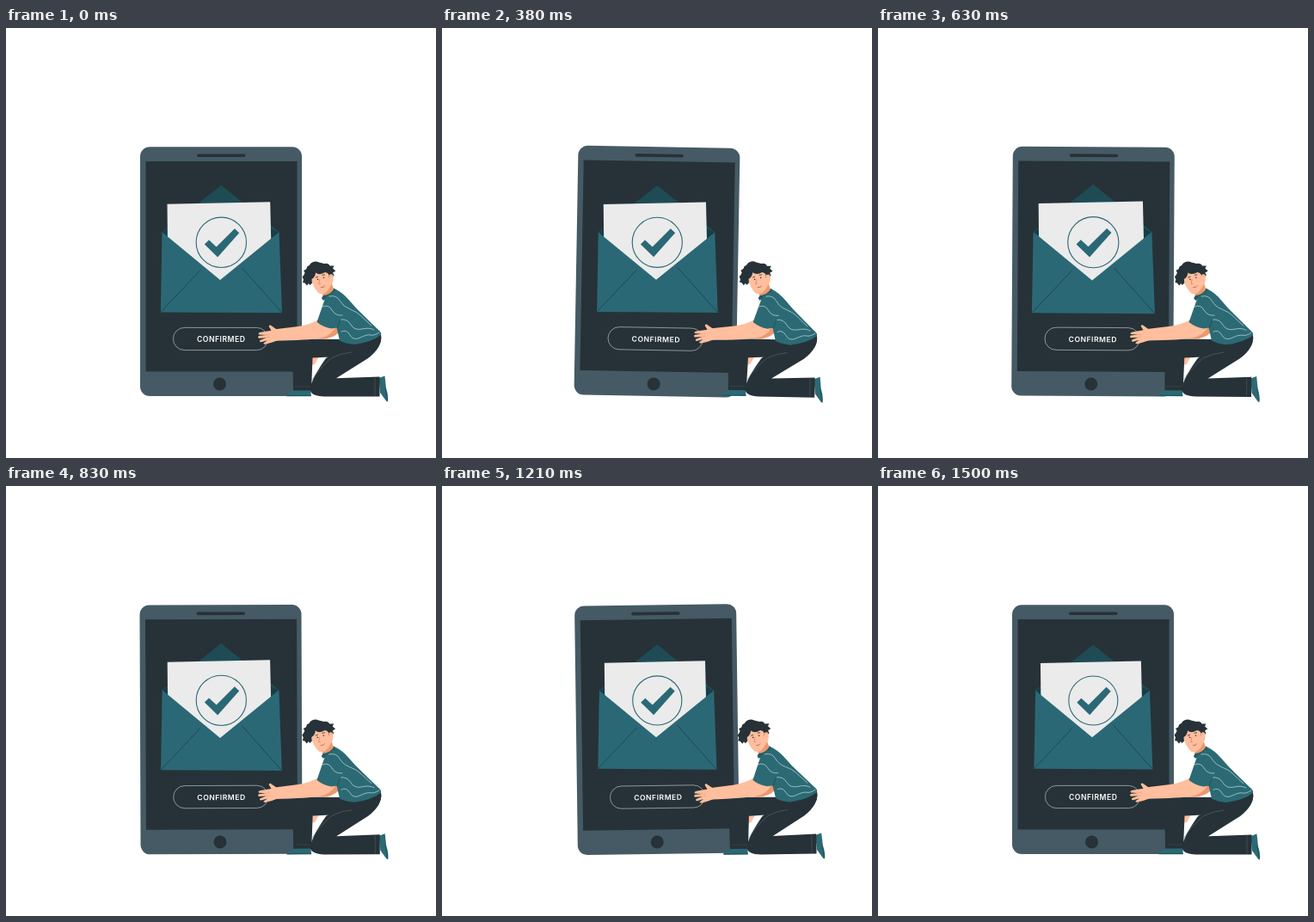
An HTML page with a canvas for the animation above (1.54 s loop, 500x500 px).

```html
<!DOCTYPE html>
<html lang="en">
<head>
<meta charset="utf-8">
<title>Confirmed</title>
<style>
html, body { margin: 0; width: 100%; height: 100%; overflow: hidden; background: #fff; }
canvas { display: block; width: 500px; height: 500px; }
</style>
</head>
<body>
<canvas id="stage"></canvas>
<script>
const canvas = document.getElementById('stage');
const ctx = canvas.getContext('2d');
const dpr = window.devicePixelRatio || 1;
canvas.width = canvas.height = 500 * dpr;

const LOOP = 1540, STEPS = 37;
const BODY = '#455a64', DARK = '#263238', TEAL = '#2b6875', DEEP = '#1f4b55';
const PAPER = '#ebebeb', SKIN = '#ffbe9d', SHADE = '#eb996e';
const SHIRT = '#2b6a74', WAVE = '#c9dadd';

// Envelope beat: [part of the cycle, scale]
const BEAT = [[0, 1], [.14, 1.043], [.28, .983], [.42, 1.014], [.7, .98], [1, .977]];

function fill(d, color) {
  ctx.fillStyle = color;
  ctx.fill(new Path2D(d));
}

function line(d, color, width) {
  ctx.strokeStyle = color;
  ctx.lineWidth = width;
  ctx.stroke(new Path2D(d));
}

function box(x, y, w, h, r, color) {
  ctx.beginPath();
  ctx.roundRect(x, y, w, h, r);
  ctx.fillStyle = color;
  ctx.fill();
}

function disc(x, y, r, color) {
  ctx.beginPath();
  ctx.arc(x, y, r, 0, 2 * Math.PI);
  ctx.fillStyle = color;
  ctx.fill();
}

function around(x, y, angle, scale, draw) {
  ctx.save();
  ctx.translate(x, y);
  ctx.rotate(angle);
  ctx.scale(scale, scale);
  ctx.translate(-x, -y);
  draw();
  ctx.restore();
}

function swing(p) {
  const turn = p < .25 ? 4 * p : p < .75 ? 2 - 4 * p : 4 * p - 4;
  return turn * Math.PI / 180;
}

function beat(p) {
  const i = Math.max(1, BEAT.findIndex(k => k[0] >= p));
  const [p0, s0] = BEAT[i - 1], [p1, s1] = BEAT[i];
  return s0 + (s1 - s0) * (p - p0) / (p1 - p0);
}

function phone() {
  box(156, 138.3, 188, 289.7, 11, BODY);
  box(162.5, 155, 176, 244.5, 0, DARK);
  box(222, 146.5, 56.5, 3.6, 1.8, DARK);
  disc(248.5, 414, 7.5, DARK);

  ctx.beginPath();
  ctx.roundRect(194.4, 348.4, 110.2, 26.2, 13.1);
  ctx.strokeStyle = '#d4d8da';
  ctx.lineWidth = .6;
  ctx.stroke();

  ctx.fillStyle = '#fff';
  ctx.font = '600 8.6px Inter, sans-serif';
  ctx.letterSpacing = '.5px';
  ctx.textAlign = 'center';
  ctx.textBaseline = 'alphabetic';
  ctx.fillText('CONFIRMED', 250.2, 365.1);
}

function envelope() {
  fill('M181.7 237L250.3 182.8L317.3 237L318 262H181Z', DEEP);
  fill('M181.7 238L190 232V246ZM317.3 238L306 232V248Z', '#173d46');
  fill('M187.5 204.7L307.2 202.2L308.6 262L249 300L188 256Z', PAPER);
  fill('M181.5 237.3L249 293L317.5 237.3L321 331.3L179.8 330.4Z', TEAL);
  line('M180.5 329.7L226 281.5M320.5 330.7L274 278.5', '#1b444f', .9);
  ctx.beginPath();
  ctx.arc(250.3, 249.3, 29.2, 0, 2 * Math.PI);
  ctx.strokeStyle = TEAL;
  ctx.lineWidth = 1.1;
  ctx.stroke();
  fill('M230.8 251.6L236 246.5L244.6 254.4L265.9 233.2L271.2 238.2L246.1 266.4Z', TEAL);
}

function legs() {
  fill('M356 383L364 382L359 391L355 392Z', SKIN);
  fill('M326 428.3Q326 425.5 330 424L339 420H354L355 428.3Z', SHIRT);
  line('M327 427.5H354', '#1d4a53', .8);
  fill('M433.5 407L440.5 404.5L442 419Q444.8 427 444 434.5L442.3 434L435 424Z', SHIRT);
  line('M441 418L443.5 433', '#1d4a53', .7);

  // Kneeling leg, then the raised one
  fill('M436 357Q438 371 421 384L384 407.3L434.5 405.4V428.5H370Q354 428 353.5 420Q355 408 372 384L402 366Z', DARK);
  fill('M334 421.5L333.3 378Q332 362 344 361.5L389 362L409 366L436 356Q438 366 430 374Q412 384 372 382.7L356.5 383.5L355 421.5Z', DARK);
  line('M356 409Q363 397 378 384Q389 378 402 377', '#697078', .5);
  line('M429 406V428', '#59646b', .5);
  line('M336 417H354', '#4a555c', .4);
}

function arms() {
  fill('M384 347L388 353Q378 364 360 361L366 352Z', SHADE);
  fill('M311 350.5L340 347Q354 345 365 338L383 348Q378 358 366 360.5Q352 363 312 363.8Z', SKIN);
  fill('M314 350L307.5 345.5Q304.8 345.5 306.2 348L308.5 351.7L296 353.8Q292.5 354.7 294 356.4'
    + 'L302 357L294 358Q292 359.6 294.3 360.8L302.5 360.2L295.5 363Q294 364.8 296.5 365.2'
    + 'L304 363.2L299.5 366.2Q299 368 302 367.6L309 365.7L317 362.8Z', SKIN);
  line('M301 357L307 356.6M302 360.3L307 359.3', SHADE, .5);
}

function shirt() {
  fill('M370 307Q377 302 382 303Q392 308 399 316.5Q407 326 415 333.5L433 351Q437 354 436 357Q426 365 405 368'
    + 'Q394 367 388 363.5L384.5 348.5L378.5 349.5Q369 348 361.5 342L370.5 316L367.5 315Z', SHIRT);
  ctx.save();
  ctx.lineCap = 'round';
  line('M376 312Q384 310 388 317T400 327T412 334T425 346', WAVE, .7);
  line('M368 324Q375 321 379 328T391 334', WAVE, .7);
  line('M389 339Q397 338 401 345T414 350T428 351', WAVE, .7);
  line('M390 353Q396 350 400 357T412 360T424 357T434 354', WAVE, .7);
  ctx.restore();
  line('M385 349L389 338', DEEP, .8);
  fill('M367 314Q370 308 377 306L381.5 302.5L383 306L374 311L369 317Z', '#235a64');
}

function head() {
  fill('M365 302L378 294L381 304Q376 311 368.5 311Z', SHADE);
  fill('M354 284Q355 278 365 278Q378 279 380 287Q382 294 378.5 298Q376 304 371.5 308Q365 311 362 306.5Q355 299 354 284Z', SKIN);
  fill('M350 299.5L347.5 296.5L345 296L346 292.5L344.5 289.5Q347 287 347.5 284.5L346 282'
    + 'Q350 281 350 277.5Q353 276.5 354.5 273.5Q359 270 364 272.5L370 274Q375 273 376.5 276.5'
    + 'L381.5 276.5L380 279.5L383.3 282.5L380 284.5L381.5 287.5L379 290L375.5 290'
    + 'Q376.5 285 371 284Q365 288 360 284.5Q359.5 290 355.5 292L356 296.5L353.5 299L351.8 297Z', DARK);
  disc(378, 288.8, 2.5, SKIN);
  line('M377 288.5Q378.5 287 379.5 288.8', SHADE, .6);
  line('M360 290.3L363 289.1M367.5 287.3L371 286.8', DARK, .8);
  disc(362.5, 292.3, .8, DARK);
  disc(369.5, 290.3, .8, DARK);
  line('M364.8 292L363.8 297.5L366 297.6', '#c56d5b', .6);
  line('M366 301.5Q369.5 302.2 371 299.5', '#9b4c47', .7);
}

function person() {
  legs();
  arms();
  shirt();
  head();
}

function render(now) {
  const step = Math.floor((now + 3) % LOOP * STEPS / LOOP);
  const phase = step / (STEPS - 1);
  const angle = swing(phase);
  ctx.setTransform(dpr, 0, 0, dpr, 0, 0);
  ctx.fillStyle = '#fff';
  ctx.fillRect(0, 0, 500, 500);
  around(250, 283, angle, 1, phone);
  around(250.4, 257, 0, beat(phase), envelope);
  around(368, 353, angle, 1, person);
}

let start;
function tick(now) {
  start ??= now;
  render(now - start);
  requestAnimationFrame(tick);
}
render(0);
requestAnimationFrame(tick);
</script>
</body>
</html>
```
